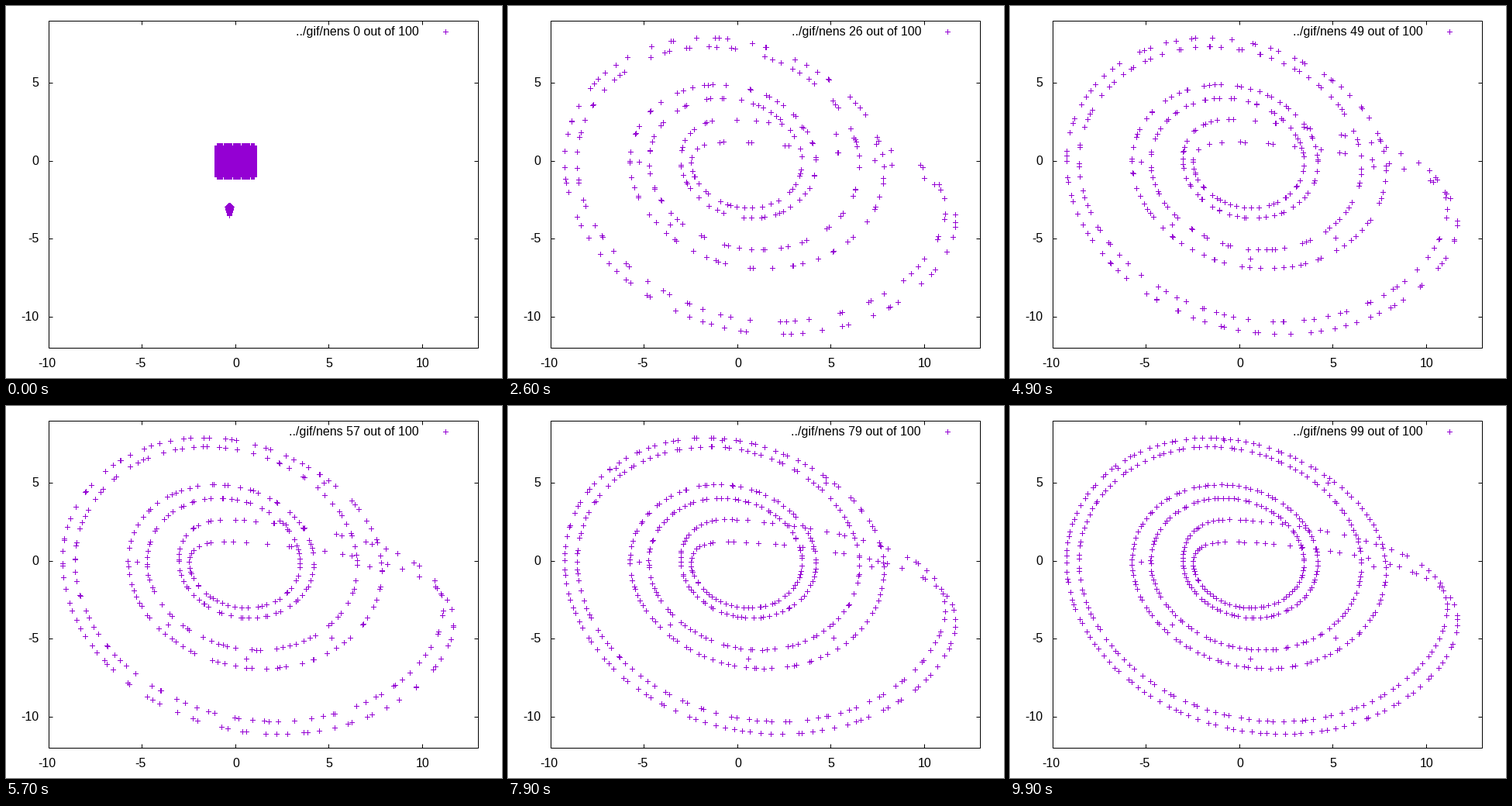
Animation of 640 by 480 pixels, one loop 10 s. Source, as a matplotlib script:

```python
import numpy as np
import matplotlib.pyplot as plt
from matplotlib.animation import FuncAnimation

plt.rcParams["font.family"] = "Liberation Sans"
plt.rcParams["path.simplify"] = False

W, H, DPI = 640, 480, 100
PX = 72 / DPI
LEFT, RIGHT, TOP, BOTTOM = 55, 609, 19, 441
PURPLE = "#9400d3"
FRAMES = 100

# Roessler system; the cycle is two triple turns joined end to end
A, B, C, DT = 0.212, 0.2, 5.7, 0.01
STARTS = (-2.49, -3.03)
STRAYS = 8


def to_px(x, y):
    col = LEFT + (np.asarray(x) + 10) * (RIGHT - LEFT) / 23
    row = TOP + (9 - np.asarray(y)) * (BOTTOM - TOP) / 21
    return np.rint(col), np.rint(row)


def flow(p):
    x, y, z = p
    return np.array([-y - z, x + A * y, B + z * (x - C)])


def rk4(p):
    k1 = flow(p)
    k2 = flow(p + DT / 2 * k1)
    k3 = flow(p + DT / 2 * k2)
    k4 = flow(p + DT * k3)
    return p + DT / 6 * (k1 + 2 * k2 + 2 * k3 + k4)


def orbit(x0, turns, max_steps=4000):
    """Follow the flow from (x0, 0) until it has crossed the left axis."""
    p = np.array([x0, 0, B / (C - x0)])
    path = [p[:2]]
    for _ in range(max_steps):
        q = rk4(p)
        if p[1] > 0 >= q[1] and q[0] < 0:
            turns -= 1
            if turns == 0:
                break
        p = q
        path.append(p[:2])
    return np.array(path)


def build_cycle():
    parts = []
    for x0, x1 in zip(STARTS, STARTS[::-1]):
        path = orbit(x0, 3)
        s = np.linspace(0, 1, len(path))[:, None]
        parts.append(path + (np.array([x1, 0]) - path[-1]) * s ** 16)
    path = np.vstack(parts)
    step = np.sqrt(np.hypot(*np.diff(path, axis=0).T))
    dist = np.append(0, np.cumsum(step))
    return dist / dist[-1], path[:, 0], path[:, 1]


def build_strays():
    """Evenly timed points on the middle turn between the two strands."""
    mid = np.mean(STARTS)
    first, both = len(orbit(mid, 1)), orbit(mid, 2)
    picks = np.linspace(first, len(both) - 1, STRAYS, endpoint=False)
    return both[picks.astype(int)]


U, CX, CY = build_cycle()
STRAY_XY = build_strays()
JITTER = np.random.default_rng(7).uniform(-1, 1, 800)


def initial_cloud():
    side = np.linspace(-1, 1, 45)
    x, y = to_px(*(g.ravel() for g in np.meshgrid(side, side)))
    rows = np.arange(257, 271)
    half = np.minimum(rows - 256, (270 - rows) / 3.5)
    drop = [(288 + d, row) for row, w in zip(rows, half)
            for d in range(-int(w), int(w) + 1)]
    dx, dy = np.array(drop).T
    return np.append(x, dx), np.append(y, dy)


def ensemble(n):
    if n == 0:
        return initial_cloud()
    count = int(250 + 3.6 * n)
    spread = 1 - 0.006 * n
    u = ((np.arange(count) + spread * JITTER[:count]) / count) % 1
    sx, sy = STRAY_XY[:n // 9].T
    return to_px(np.append(np.interp(u, U, CX), sx),
                 np.append(np.interp(u, U, CY), sy))


def crosses(x, y):
    gap = np.full(len(x), np.nan)
    xs = np.column_stack([x - 3, x + 4, gap, x + 0.5, x + 0.5, gap])
    ys = np.column_stack([y + 0.5, y + 0.5, gap, y - 3, y + 4, gap])
    return xs.ravel(), ys.ravel()


fig = plt.figure(figsize=(W / DPI, H / DPI), dpi=DPI, facecolor="white")
ax = fig.add_axes([0, 0, 1, 1])
ax.set_xlim(0, W)
ax.set_ylim(H, 0)
ax.axis("off")


def line(xs, ys, color="black"):
    return ax.plot(xs, ys, color=color, lw=PX, solid_capstyle="butt",
                   solid_joinstyle="miter", snap=False)[0]


def label(x, y, text, align):
    return ax.text(x, y, text, size=16 * PX, ha=align, va="baseline")


l, r, t, b = LEFT + 0.5, RIGHT + 0.5, TOP + 0.5, BOTTOM + 0.5
line([l, r, r, l, l], [t, t, b, b, t])
for v in range(-10, 11, 5):
    col, row = to_px(v, v)
    if v > -10:
        line([col + 0.5] * 2, [b, b - 5])
        line([col + 0.5] * 2, [t, t + 5])
    label(col + (0.5 if v >= 0 else -2), 466, str(v), "center")
    if v < 10:
        line([l, l + 5], [row + 0.5] * 2)
        line([r, r - 5], [row + 0.5] * 2)
        label(42.5, row + 5, str(v), "right")

points = line([], [], PURPLE)
line(*crosses(np.array([567.0]), np.array([33.0])), PURPLE)
title = label(533, 38, "", "right")


def update(n):
    points.set_data(*crosses(*ensemble(n)))
    title.set_text(f"../gif/nens {n} out of 100")
    return points, title


anim = FuncAnimation(fig, update, frames=FRAMES, interval=100,
                     repeat=True, repeat_delay=0, blit=False)
plt.show()
```
